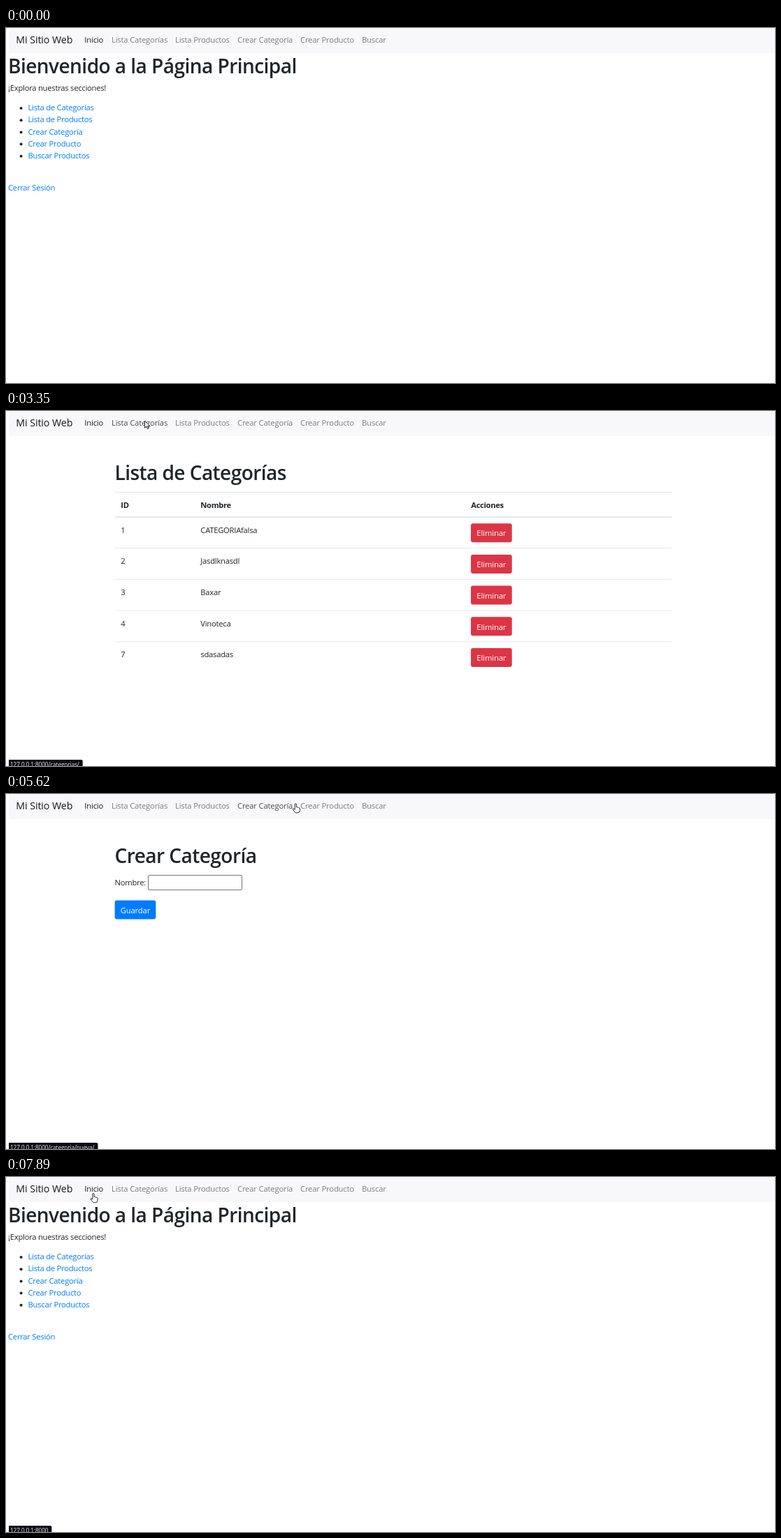
These frames come from a looping animation (1100x509 px, 8000 ms). An HTML page:

```html
<!DOCTYPE html>
<html lang="es">
<head>
<meta charset="utf-8">
<style>
  html, body { margin: 0; width: 100%; height: 100%; overflow: hidden; background: #fff; }
  svg { display: block; font: 11.2px "Open Sans", "Noto Sans", sans-serif; letter-spacing: -.02em; fill: #212529; }
  .h1 { font-size: 28px; font-weight: 600; letter-spacing: -.019em; }
  .b { font-weight: 700; letter-spacing: -.03em; }
  .brand { font-size: 14.2px; letter-spacing: -.005em; fill: rgba(0,0,0,.9); }
  .nav { letter-spacing: -.013em; }
  .link { fill: #007bff; }
  .btn { fill: #fff; text-anchor: middle; letter-spacing: -.01em; }
  .field { fill: #fff; stroke: #767676; }
  .line { fill: none; stroke: #dee2e6; }
  .url { font-size: 8.2px; letter-spacing: -.01em; fill: #e8eaed; }
  .cursor path { fill: #fff; stroke: #111; stroke-width: .9; stroke-linejoin: round; }
</style>
</head>
<body>
<svg id="stage" width="1100" height="509" viewBox="0 0 1100 509"></svg>
<script>
const LOOP = 8000, ENTER = 120;

// label, x, status path
const LINKS = [
  ['Inicio', 112.3, ''],
  ['Lista Categorías', 151, '/categorias/'],
  ['Lista Productos', 242, '/productos/'],
  ['Crear Categoría', 331, '/categoria/nueva/'],
  ['Crear Producto', 421, '/producto/nuevo/'],
  ['Buscar', 509, '/buscar/']
];

// pointer moves: start, end, x, y of the hot spot at the end
const MOVES = [
  [ENTER, 860, 137, 106], [930, 1520, 141, 18.5], [1720, 2000, 138, 10], [2390, 2530, 138, 16.5],
  [2590, 3130, 198.5, 14], [3620, 4090, 255, 10], [4430, 4890, 376.5, 22.5], [5220, 5890, 435, 9],
  [6230, 6290, 439.5, 15.5], [6760, 6830, 444, 15.5], [7090, 7820, 125, 23.5]
];

// page, time of the click, time it appears
const VISITS = [
  ['home', 0, 0], ['categories', 3200, 3270], ['products', 4290, 4430],
  ['newCategory', 5220, 5220], ['newProduct', 6090, 6430], ['home', 7820, 7820]
];

const text = (x, y, s, cls = '') => `<text x="${x}" y="${y}" class="${cls}">${s}</text>`;
const rect = (x, y, w, h, r, attr) => `<rect x="${x}" y="${y}" width="${w}" height="${h}" rx="${r}" ${attr}/>`;
const rule = (y, w = .8) => `<path class="line" stroke-width="${w}" d="M156 ${y}H952"/>`;
const button = (x, y, s, color) => rect(x, y, 58.7, 27, 3, `fill="${color}"`) + text(x + 29.3, y + 18.2, s, 'btn');
const remove = (x, y) => button(x, y, 'Eliminar', '#dc3545');
const save = y => button(155.6, y, 'Guardar', '#007bff');
const field = (x, y, w, h) => rect(x, y, w, h, 1.5, 'class="field"');
const title = s => text(155.5, 98.8, s, 'h1');
const nameRow = text(155.5, 131.3, 'Nombre:') + field(203.5, 116.5, 134, 21);

const home = text(3, 64.5, 'Bienvenido a la Página Principal', 'h1') +
  text(3, 89.6, '¡Explora nuestras secciones!') +
  ['Lista de Categorías', 'Lista de Productos', 'Crear Categoría', 'Crear Producto', 'Buscar Productos']
    .map((s, i) => `<circle cx="21.6" cy="${115 + i * 17.2}" r="2"/>` + text(31.5, 118.2 + i * 17.2, s, 'link')).join('') +
  text(3, 232.8, 'Cerrar Sesión', 'link');

const categories = title('Lista de Categorías') + rule(116.5) + rule(152, 1.4) +
  text(164.3, 138.6, 'ID', 'b') + text(278.3, 138.6, 'Nombre', 'b') + text(665.3, 138.6, 'Acciones', 'b') +
  [[1, 'CATEGORIAfalsa'], [2, 'Jasdlknasdl'], [3, 'Baxar'], [4, 'Vinoteca'], [7, 'sdasadas']].map(([id, name], i) => {
    const y = i * 44.7;
    return (i ? rule(152 + y) : '') + text(164.3, 174.6 + y, id) + text(278.3, 174.6 + y, name) + remove(665, 161.2 + y);
  }).join('');

const products = title('Lista de Productos') +
  rect(155.7, 116.5, 796, 204, 3, 'class="line" stroke-width=".9"') + rule(218.5) +
  [['Lolcito', '55588'], ['Saca corchos', '123']].map(([name, price], i) => {
    const y = i * 102;
    return text(170.3, 138.6 + y, name, 'b') + text(170.3, 156 + y, 'Categoría: Jasdlknasdl') +
      text(170.3, 173.2 + y, `Precio: $${price}.00`) + remove(170.4, 183 + y);
  }).join('');

const newCategory = title('Crear Categoría') + nameRow + save(152.5);

const newProduct = title('Crear Producto') + nameRow +
  text(155.5, 166, 'Categoria:') + field(210.5, 152.5, 116, 18) + text(214, 165.8, '---------') +
  '<path d="M316.8 160.2l2.7 2.7 2.7-2.7" fill="none" stroke="#111" stroke-width="1.5"/>' +
  text(155.5, 202.8, 'Precio:') + field(192.5, 187.5, 134, 21) + save(224);

const scenes = { home, categories, products, newCategory, newProduct };
const stage = document.getElementById('stage');
stage.innerHTML = rect(4, 0, 1096, 36, 0, 'fill="#f8f8fa"') + text(14.3, 21.7, 'Mi Sitio Web', 'brand') +
  LINKS.map(([s, x]) => text(x, 20.6, s, 'nav')).join('') +
  Object.entries(scenes).map(([id, body]) => `<g id="${id}">${body}</g>`).join('') +
  '<g id="status"><path id="bar" fill="#0b0b14"/>' + text(6, 510.3, '', 'url') + '</g>' +
  `<g id="pointer" class="cursor">
    <path id="arrow" d="M0 0V10.2L2.4 8 4 11.6 5.6 10.9 4 7.4H7.2Z"/>
    <path id="hand" d="M-1.1 1.1a1.1 1.1 0 0 1 2.2 0V5q1.3-.5 2 .4 1.3-.3 1.7.6 1.3 0 1.3 1.4V9.6q0 3.6-3.4 3.6H0Q-1.8 11.5-3.8 8.4q-.3-1.3.9-1.2.8.2 1.8 1.5Z"/>
  </g>`;

const el = id => document.getElementById(id);
const show = (node, on) => { node.style.display = on ? '' : 'none'; };
const navs = stage.querySelectorAll('.nav');
const url = stage.querySelector('.url');
const ramp = (t, a, b) => Math.min(1, Math.max(0, (t - a) / (b - a)));

function pointerAt(t) {
  let x = 1022, y = 481;
  for (const [start, end, toX, toY] of MOVES) {
    const u = ramp(t, start, end), e = u * u * (3 - 2 * u);
    x += (toX - x) * e;
    y += (toY - y) * e;
  }
  return [x, y];
}

function draw(t) {
  const page = VISITS.findLast(v => v[2] <= t)[0];
  for (const id in scenes) show(el(id), id === page);

  const [x, y] = pointerAt(t);
  const over = y < 32 ? LINKS.findLastIndex(l => x >= l[1] - 6) : -1;
  navs.forEach((n, i) => n.setAttribute('fill', `rgba(0,0,0,${i === 0 ? .9 : i === over ? .7 : .5})`));

  // after a click the arrow stays until the loaded page sees a move
  const [, click, load] = VISITS.findLast(v => v[1] <= t);
  const waiting = click < load && !MOVES.some(([start]) => start >= load && start <= t);
  const arrow = over < 0 || waiting;
  show(el('pointer'), t >= ENTER);
  show(el('arrow'), arrow);
  show(el('hand'), !arrow);
  el('pointer').setAttribute('transform', `translate(${x} ${y})`);

  show(el('status'), over >= 0);
  if (over < 0) return;
  url.textContent = '127.0.0.1:8000' + LINKS[over][2];
  el('status').style.opacity = ramp(t, 1410, 1550) - ramp(t, 2390, 2530) + ramp(t, 2860, 2930);
  el('bar').setAttribute('d', `M4 500H${url.getComputedTextLength() + 9}q2 0 2 2V509H4Z`);
}

function tick(now) {
  draw(now % LOOP);
  requestAnimationFrame(tick);
}
draw(0);
requestAnimationFrame(tick);
</script>
</body>
</html>
```
